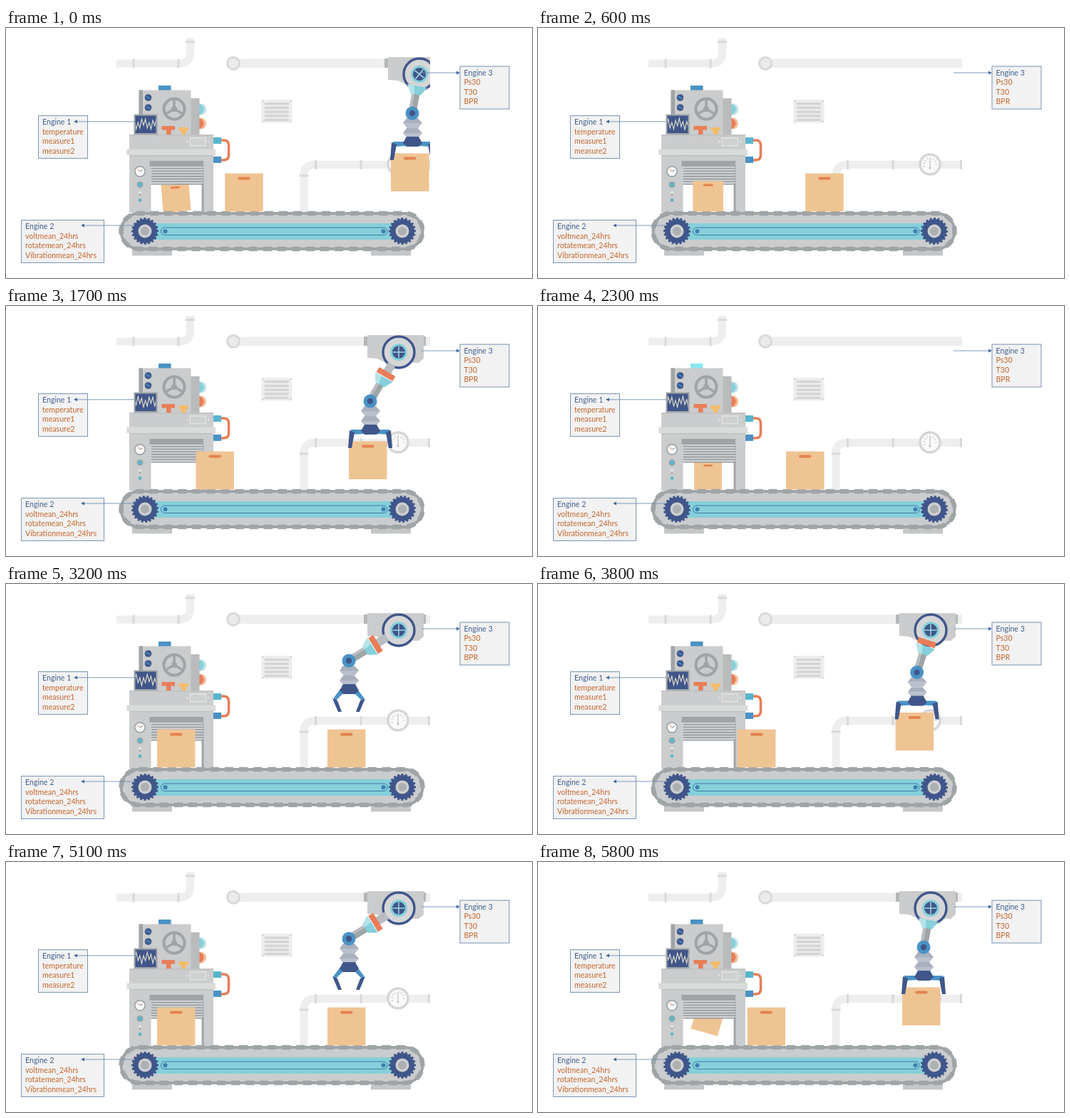
An HTML page with a canvas for the animation above (5.9 s loop, 738 by 352 pixels).

```html
<!DOCTYPE html>
<html lang="en">
<head>
<meta charset="utf-8">
<title>Conveyor</title>
<style>
html, body { margin: 0; width: 738px; height: 352px; overflow: hidden; background: #fff; }
canvas { display: block; }
</style>
</head>
<body>
<canvas id="stage" width="738" height="352"></canvas>
<script>
const g = document.getElementById('stage').getContext('2d');
const GRAY = '#cbcccd', DARK = '#9fa4a6', NAVY = '#40568a', BLUE = '#4a92c4', CYAN = '#85d0da',
  ORANGE = '#e87d57', TAN = '#efc493', PIPE = '#eeeeee', FLANGE = '#d8d9d9', STEEL = '#b4b7b8';
const STEPS = 19, RIDE = 239, SPEED = 13.6, BOX = 53.5, FLOOR = 258.3;

function rect(color, x, y, w, h, r = 0) {
  g.fillStyle = color;
  g.beginPath();
  g.roundRect(x, y, w, h, r);
  g.fill();
}
function disc(color, x, y, r) {
  g.fillStyle = color;
  g.beginPath();
  g.arc(x, y, r, 0, 7);
  g.fill();
}
function curve(color, w, d) {
  g.strokeStyle = color;
  g.lineWidth = w;
  g.stroke(new Path2D(d));
}
function ring(color, x, y, r, w) {
  g.strokeStyle = color;
  g.lineWidth = w;
  g.beginPath();
  g.arc(x, y, r, 0, 7);
  g.stroke();
}
function line(color, w, ...pts) {
  curve(color, w, 'M' + pts.join(' '));
}
function poly(color, ...pts) {
  g.fillStyle = color;
  g.fill(new Path2D('M' + pts.join(' ') + 'Z'));
}
function at(x, y, angle, draw) {
  g.save();
  g.translate(x, y);
  g.rotate(angle);
  draw();
  g.restore();
}
function clipped(x, y, w, h, draw) {
  g.save();
  g.beginPath();
  g.rect(x, y, w, h);
  g.clip();
  draw();
  g.restore();
}
const clamp = v => Math.min(1, Math.max(0, v));
const ease = v => (v = clamp(v), v * v * (3 - 2 * v));

function carton(x, y, s = 1) {
  rect(TAN, x, y, BOX * s, BOX * s);
  rect('#e4844f', x + 18 * s, y + 5 * s, 17.5 * s, 4 * s, 2 * s);
}

function background() {
  curve(PIPE, 11, 'M155 50H243Q258.5 50 258.5 35V14');
  for (const x of [179, 242]) rect(FLANGE, x - 1.5, 43.5, 3, 13);
  rect(FLANGE, 252, 18, 13, 3);

  rect(PIPE, 322, 43.5, 273, 12.5);
  disc(FLANGE, 319, 49.8, 10);
  disc('#ebebeb', 319, 49.8, 7);

  rect('#ededed', 358.5, 101, 43, 32.5, 1);
  for (let i = 0; i < 5; i++) rect('#d2d4d5', 362.5, 105 + i * 5.7, 34.5, 3.3, 1.6);
  for (const x of [360.5, 399.5]) for (const y of [103, 131.5]) disc('#c4c6c7', x, y, 1);

  curve(PIPE, 11, 'M418 260V207Q418 192.5 433 192.5H595');
  rect(FLANGE, 411.5, 206.5, 13, 3);
  for (const x of [434.5, 498, 593.5]) rect(FLANGE, x - 1.5, 186, 3, 13);
  disc('#fafafa', 550, 192, 14);
  ring('#d5d6d7', 550, 192, 14, 3.5);
  for (let a = -3.5; a < .5; a += .5) at(550, 192, a, () => line('#c5c6c7', 1, 7, 0, 10, 0));
  line('#bcbebf', 1.2, 550, 184, 550, 197);
  disc('#bcbebf', 550, 197, 1.5);
}

function lamp(y, color, shade) {
  clipped(271, y - 9, 11, 18, () => {
    disc(shade, 273, y, 8);
    disc(color, 270, y, 7.5);
  });
}

function press(p) {
  const lit = p === 3;
  rect(lit ? '#8be8f2' : BLUE, 214, 81, 17.5, 8);
  lamp(114.5, CYAN, '#bfe0e5');
  lamp(134.5, ORANGE, lit ? '#f9b48c' : '#f0bf9c');
  rect('#b9bbbc', 259, 99, 12.5, 52);
  rect(GRAY, 186.5, 87.5, 73, 63);
  rect(DARK, 186.5, 87.5, 5.5, 35);
  for (const y of [98, 112]) {
    disc(NAVY, 199.5, y, 4.8);
    line(BLUE, 1.5, 196.5, y - 1.5, 202.5, y + 1.5);
  }
  ring(DARK, 236, 114, 14.5, 4);
  for (let i = 0; i < 3; i++) at(236, 114, Math.PI / 6 + i * 2.0944, () => line(DARK, 3.5, 0, 0, 14, 0));
  disc(DARK, 236, 114, 4);

  rect(DARK, 179.5, 121.5, 33, 28.5);
  rect(NAVY, 181.5, 123.5, 29, 24.5);
  clipped(181.5, 123.5, 29, 24.5, () => {
    const wave = [];
    for (let i = 0; i < 13; i++) {
      const k = i + p;
      wave.push(180 + i * 2.6, 135 + (k % 2 ? 1 : -1) * (5 + 3 * Math.sin(k * 2.2)));
    }
    line('#e6e0cd', 1.1, ...wave);
  });
  rect(ORANGE, 218.5, 138, 18.5, 5.5);
  rect(ORANGE, 225, 143, 6.5, 7);
  rect('#f3bc69', 242.5, 140, 13, 5);
  rect('#f3bc69', 246, 145, 6.5, 5);

  rect(GRAY, 173, 150, 118, 110);
  rect('#d9dada', 169.5, 170.5, 124.5, 8.5);
  for (const y of [150, 179]) rect('#bfc1c2', 173, y, 118, 1.5);
  rect('#e2e3e3', 257.5, 154, 23.5, 12.5);
  rect('#cfd0d1', 259, 155.5, 20.5, 9.5);
  for (const x of [254.5, 284]) disc('#e8e8e8', x, 160, 1.2);

  rect('#fff', 203.5, 195, 73, 64);
  rect(DARK, 274.5, 195, 3, 64);
  fallingBox(p);
  rect('#d0d1d3', 203.5, 195, 73, 24);
  for (let y = 197; y < 220; y += 3.7) rect('#969b9f', 203.5, y, 73, 1.6);
  rect(DARK, 201.5, 187, 75.5, 8);

  disc(DARK, 188, 202, 8);
  disc('#f8f8f8', 188, 202, 6.3);
  line(ORANGE, 1, 185, 198.5, 188, 202);
  line('#7b8c9b', 1, 188, 202, 192, 200);
  disc(DARK, 188, 220.5, 4.5);
  disc('#62b5ca', 188, 220.5, 3.2);
  disc('#e6e6e6', 188, 232, 2.2);
  rect(DARK, 187, 233, 2, 3);
  disc('#62b5ca', 188, 242.5, 2.4);

  curve(ORANGE, 3.5, 'M301 158H305Q312.5 158 312.5 165V179Q312.5 186 305 186H301');
  rect('#58b5cd', 291, 154, 11, 9);
  rect(BLUE, 291, 181, 11, 9);
}

// A small box drops into the press and rocks until it stands
function fallingBox(p) {
  const fall = (p + 2) % STEPS;
  if (fall < 1 || fall > 6) return;
  const tilt = 16 * (-.3) ** (fall - 1) * Math.PI / 180;
  const y = Math.min(239, 203 + 18 * fall);
  clipped(203.5, 195, 71, 64, () => at(238.5, y, tilt, () => carton(-19.5, -19.5, .73)));
}

function belt(travel) {
  for (const x of [177, 512]) {
    rect('#c4c6c7', x, 309, 56, 11.5);
    rect(STEEL, x, 309, 56, 4);
  }
  const r = 25, w = 423, length = 2 * (w - 2 * r) + 2 * Math.PI * r, pitch = length / 45;
  const shift = travel * 12 * pitch / RIDE;
  g.beginPath();
  g.roundRect(161.5, 261, w, 2 * r, r);
  g.fillStyle = GRAY;
  g.fill();
  g.strokeStyle = DARK;
  g.lineWidth = 4;
  g.stroke();
  g.lineWidth = 6.5;
  g.setLineDash([pitch * .6, pitch * .4]);
  g.lineDashOffset = -shift;
  g.stroke();
  g.setLineDash([]);

  rect(CYAN, 195, 275, 361, 23);
  g.strokeStyle = '#3f7aa9';
  g.lineWidth = 1;
  g.beginPath();
  g.roundRect(217.5, 281, 317.5, 10.5, 5);
  g.stroke();
  for (const x of [223.5, 529.5]) disc('#3f7fb0', x, 286.2, 3);

  for (const x of [195, 556]) at(x, 286, shift / 18, () => {
    disc(NAVY, 0, 0, 17);
    for (let i = 0; i < 20; i++) {
      g.rotate(Math.PI / 10);
      rect(NAVY, 16, -1.5, 3, 3);
    }
    disc('#cdced0', 0, 0, 9.5);
    disc('#adb0b2', 0, 0, 6);
  });
}

// The arm glides in, dips to grip a box, lifts it upright and leaves
function arm(p) {
  const leaving = p < 7, lift = 1 - ease((p - 14) / 4);
  const swing = ease((p - 6) / 5) * lift, dip = ease((p - 11) / 2) * lift;
  const grip = leaving || p > 11 ? 1 : 0;
  const dx = leaving ? 29 * (p + 1) : 15 * Math.max(0, 11 - p) ** 1.5;
  const rx = -10 - 60 * swing, ry = 55 - 12 * swing + 40 * dip;
  const hx = 551 + dx, hy = 65, ex = hx + rx, ey = hy + ry;

  clipped(300, 38, 295, 222, () => {
    if (leaving || p > 12) carton(ex - 30, ey + 56.5);

    rect(STEEL, hx - 49, 43, 6, 13);
    rect(STEEL, hx + 35, 43, 3, 13);
    poly(GRAY, hx - 44, 41, hx + 35, 41, hx + 35, 74, hx + 28, 80, hx - 20, 79, hx - 30, 74, hx - 44, 73);

    disc('#d5d6d7', hx, hy, 22);
    ring(NAVY, hx, hy, 22, 3.4);

    // Upper link, drawn outwards from the elbow
    at(ex, ey, Math.atan2(-ry, -rx), () => {
      const reach = Math.hypot(rx, ry);
      rect('#b9bdc1', 44, -6, Math.max(0, reach - 64), 12);
      rect(DARK, 7, -5.5, 22, 11);
      rect('#b9bdc1', 7, -5.5, 22, 4);
      poly(CYAN, 27, -7, 39, -14, 39, 14, 27, 7);
      poly('#b4e3e8', 27, -7, 39, -14, 39, -4, 27, -2);
      if (reach > 60) rect(ORANGE, 40, -13, 8, 26);
    });

    at(hx, hy, dx / 42, () => {
      disc(CYAN, 0, 0, 12);
      disc(NAVY, 0, 0, 9);
      line('#a8dfe6', 1.4, -8.5, 0, 8.5, 0);
      line('#a8dfe6', 1.4, 0, -8.5, 0, 8.5);
    });

    at(ex, ey, 0, () => {
      for (const y of [7, 21]) {
        poly('#a9b1bf', -8, y, 8, y, 14, y + 7, -13, y + 7);
        poly('#b9c0cb', -13, y + 7, 14, y + 7, 8, y + 14, -7, y + 14);
      }
      disc(BLUE, 0, 0, 9.5);
      disc(NAVY, 0, 0, 4.2);
      const mix = (a, b) => a + (b - a) * grip;
      const kx = mix(21, 27), ky = mix(56, 44), tx = mix(13, 29), ty = mix(72, 66);
      for (const s of [-1, 1]) {
        poly(BLUE, s * 6, 38, s * 12, 40, s * kx, ky - 4, s * kx, ky + 3, s * 8, 46);
        poly(NAVY, s * (kx + 2), ky - 3, s * (kx - 5), ky, s * (tx - 3), ty, s * (tx + 2), ty);
      }
      poly(NAVY, -8, 33, 9, 33, 14, 42, 9, 47, -8, 47, -13, 42);
    });
  });
}

function note(x, y, w, title, ...items) {
  rect('#f2f2f2', x, y, w, 61);
  g.strokeStyle = '#7896b8';
  g.lineWidth = 1;
  g.strokeRect(x + .5, y + .5, w - 1, 60);
  g.font = '10.6px Lato, Carlito, sans-serif';
  [title, ...items].forEach((text, i) => {
    g.fillStyle = i ? '#c5652d' : '#3f5f8f';
    g.fillText(text, x + 6, y + 13.2 + i * 13.5);
  });
}

function arrow(from, to, y) {
  const back = to + 5 * Math.sign(from - to);
  line('#6d90b5', .9, from, y, back, y);
  poly('#3f6c9e', to, y, back, y - 2.5, back, y + 2.5);
}

function draw(p) {
  g.fillStyle = '#fff';
  g.fillRect(0, 0, 738, 352);
  background();
  press(p);

  // A box leaves the press at step 12 and waits for the claw a cycle later
  const ridden = q => Math.min(RIDE, Math.max(0, (q - 12) * SPEED));
  const travel = ridden(p < 11 ? p + STEPS : p);
  const size = p > 10 ? 1 : Math.min(1, .75 + (p - 4) * .05);
  belt(travel);
  if (p < 13) carton(212 + ridden(p + STEPS), FLOOR - BOX);
  if (p > 4) carton(238.7 - BOX * size / 2 + (p > 10 ? travel : 0), FLOOR - BOX * size, size);
  arm(p);

  note(45, 123, 70, 'Engine 1', 'temperature', 'measure1', 'measure2');
  note(21, 270, 117, 'Engine 2', 'voltmean_24hrs', 'rotatemean_24hrs', 'Vibrationmean_24hrs');
  note(636.5, 53.5, 70, 'Engine 3', 'Ps30', 'T30', 'BPR');
  arrow(181, 95, 131.8);
  arrow(180, 105, 278);
  arrow(583, 637, 63);
}

// Ten pictures a second; the first and the middle one are held twice as long
function tick() {
  const n = Math.floor(performance.now() % 5900 / 100);
  draw((n - (n >= 1) - (n >= 30)) % STEPS);
  requestAnimationFrame(tick);
}
tick();
</script>
</body>
</html>
```
